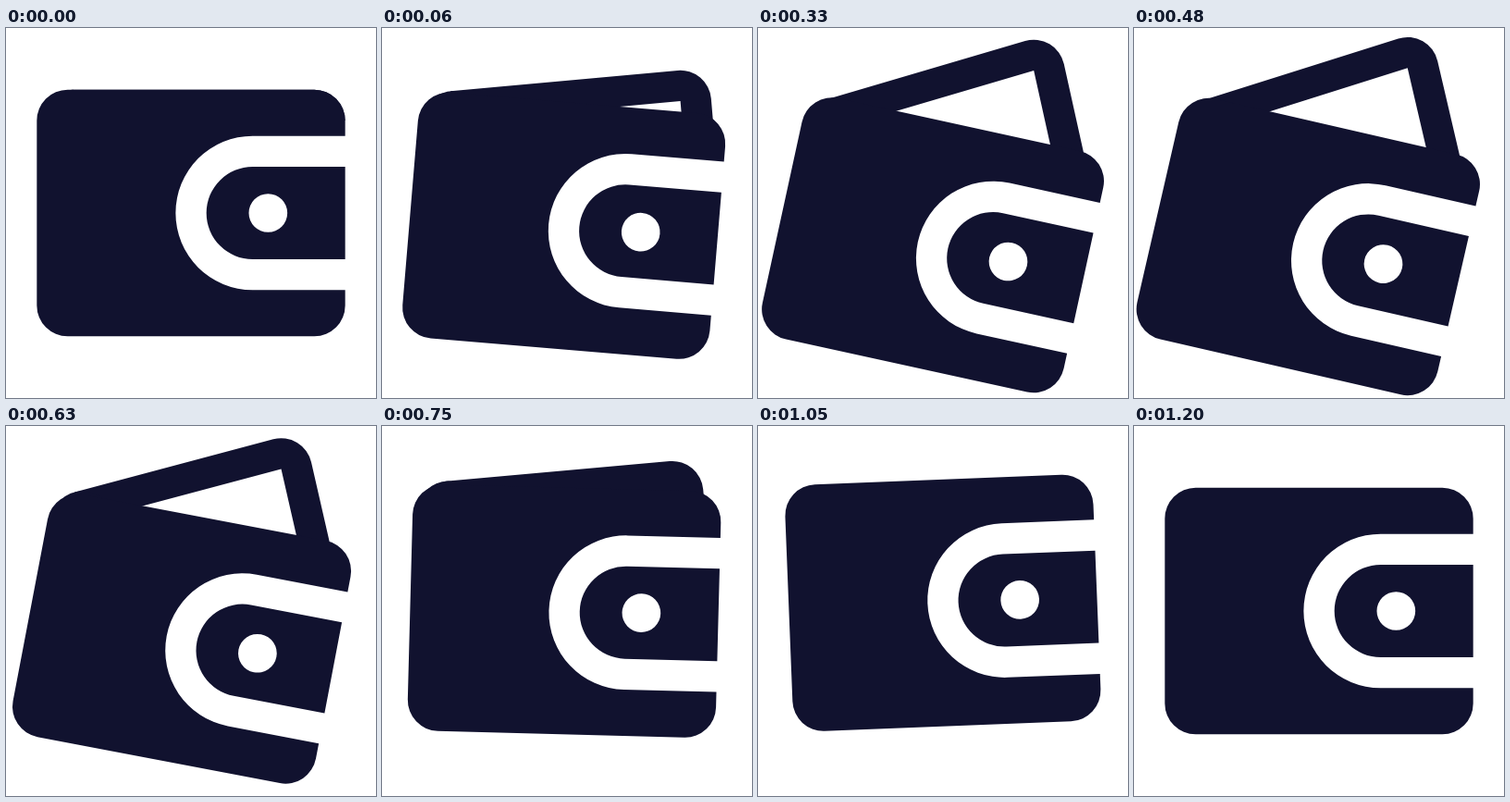
Animation of 400 by 400 pixels, one loop 3.23 s. Source, as an HTML page:

```html
<!DOCTYPE html>
<html lang="en">
<head>
<meta charset="utf-8">
<title>Wallet</title>
<style>
  html, body { margin: 0; width: 100%; height: 100%; overflow: hidden; background: #fff; }
  svg { display: block; width: 100vw; height: 100vh; fill: #11122f; }
</style>
</head>
<body>
<svg viewBox="0 0 400 400">
  <path id="back"/>
  <circle id="hinge" r="33.33"/>
  <g id="wallet">
    <path d="M66.67 66.67H333.33A33.33 33.33 0 0 1 366.67 100V116.67H266.67A83.33 83.33 0 0 0 266.67 283.33H366.67V300A33.33 33.33 0 0 1 333.33 333.33H66.67A33.33 33.33 0 0 1 33.33 300V100A33.33 33.33 0 0 1 66.67 66.67Z"/>
    <path fill-rule="evenodd" d="M366.67 150H266.67A50 50 0 0 0 266.67 250H366.67ZM262.5 200A20.83 20.83 0 1 1 304.17 200A20.83 20.83 0 1 1 262.5 200Z"/>
  </g>
</svg>
<script>
const LOOP = 3230, STEP = 30;
const OPEN = 560, SHUT = 880, REST = 1200;
const R = 33.33;                      // band thickness and corner radius
const PIVOT = { x: 33.33, y: 166.67 };
const TILT = 13, RECOIL = -5;         // degrees

// time, flap corner x, y, top edge angle, side edge angle, wallet shift x, y
const CLOSING = [
  [OPEN, 295.5, 43, 17.6, 13.2, 0, 0],
  [630, 297.5, 46.5, 14.9, 12.9, -0.8, -0.5],
  [750, 314, 71.3, 5.1, 5, -2, -4.4],
  [SHUT, 323.6, 69.4, 5, 5, -2.8, -4.8]
];

const [back, hinge, wallet] = ['back', 'hinge', 'wallet'].map(id => document.getElementById(id));
const rad = deg => deg * Math.PI / 180;
const smooth = p => p * p * (3 - 2 * p);

// cubic-bezier(.2, .8, .4, 1)
function easeOut(p) {
  const curve = (s, a, b) => 3 * (1 - s) * (1 - s) * s * a + 3 * (1 - s) * s * s * b + s * s * s;
  let lo = 0, hi = 1;
  for (let i = 0; i < 30; i++) {
    const mid = (lo + hi) / 2;
    if (curve(mid, 0.2, 0.4) < p) lo = mid; else hi = mid;
  }
  return curve(lo, 0.8, 1);
}

// Smooth curve through the rows, at rest at both ends
function sample(rows, t, col) {
  const last = rows.length - 1;
  let i = 0;
  while (i < last - 1 && t >= rows[i + 1][0]) i++;
  const slope = k => k === 0 || k === last ? 0
    : (rows[k + 1][col] - rows[k - 1][col]) / (rows[k + 1][0] - rows[k - 1][0]);
  const span = rows[i + 1][0] - rows[i][0], p = (t - rows[i][0]) / span, q = 1 - p;
  return rows[i][col] * (1 - smooth(p)) + rows[i + 1][col] * smooth(p)
    + span * p * q * (q * slope(i) - p * slope(i + 1));
}

function pose(t) {
  if (t >= REST) return { tilt: 0, dx: 0, dy: 0 };
  if (t < OPEN) {
    const g = easeOut(t / OPEN);
    return {
      tilt: TILT * g, dx: 0, dy: 0,
      flap: [333.3 - 24.2 * g - 13.6 * g * g, 100 - 57 * g, 12.2 * g + 5.4 * g * g, 13.2 * g]
    };
  }
  if (t < SHUT) {
    const [x, y, top, side, dx, dy] = [1, 2, 3, 4, 5, 6].map(c => sample(CLOSING, t, c));
    const tilt = TILT + (RECOIL - TILT) * smooth((t - OPEN) / (SHUT - OPEN));
    return { tilt, dx, dy, flap: [x, y, top, side] };
  }
  const k = 1 - smooth((t - SHUT) / (REST - SHUT));
  return { tilt: RECOIL * k, dx: -2.8 * k, dy: -4.8 * k };
}

function drawFlap({ tilt, dx, dy, flap }) {
  const shown = flap ? 'inline' : 'none';
  back.style.display = hinge.style.display = shown;
  if (!flap) return;
  const [x, y] = flap, [w, top, side] = [tilt, flap[2], flap[3]].map(rad);

  // Left end follows the wallet's rounded top left corner
  const cornerX = PIVOT.x + dx + 33.33 * Math.cos(w) + 100 * Math.sin(w) * 2 / 3;
  const bx = cornerX + 5, by = y + (x - bx) * Math.tan(top);

  // Side band runs down until it is tucked behind the wallet's top edge
  const relX = x - PIVOT.x - dx, relY = y - PIVOT.y - dy;
  const gap = -100 - (relY * Math.cos(w) - relX * Math.sin(w));
  const len = Math.max(0, gap / Math.cos(w + side) + 30);
  const ex = x + len * Math.sin(side), ey = y + len * Math.cos(side);

  const ux = -R * Math.sin(top), uy = -R * Math.cos(top);
  const sx = R * Math.cos(side), sy = -R * Math.sin(side);
  back.setAttribute('d',
    `M${bx} ${by}L${bx + ux} ${by + uy}L${x + ux} ${y + uy}` +
    `A${R} ${R} 0 0 1 ${x + sx} ${y + sy}L${ex + sx} ${ey + sy}L${ex} ${ey}L${x} ${y}Z`);
  hinge.setAttribute('cx', bx);
  hinge.setAttribute('cy', by);
}

function draw(ms) {
  const p = pose(Math.floor((ms % LOOP) / STEP) * STEP);
  wallet.setAttribute('transform',
    `translate(${p.dx} ${p.dy}) rotate(${p.tilt} ${PIVOT.x} ${PIVOT.y})`);
  drawFlap(p);
}

const start = performance.now();
function tick() {
  draw(performance.now() - start);
  requestAnimationFrame(tick);
}
tick();
</script>
</body>
</html>
```
